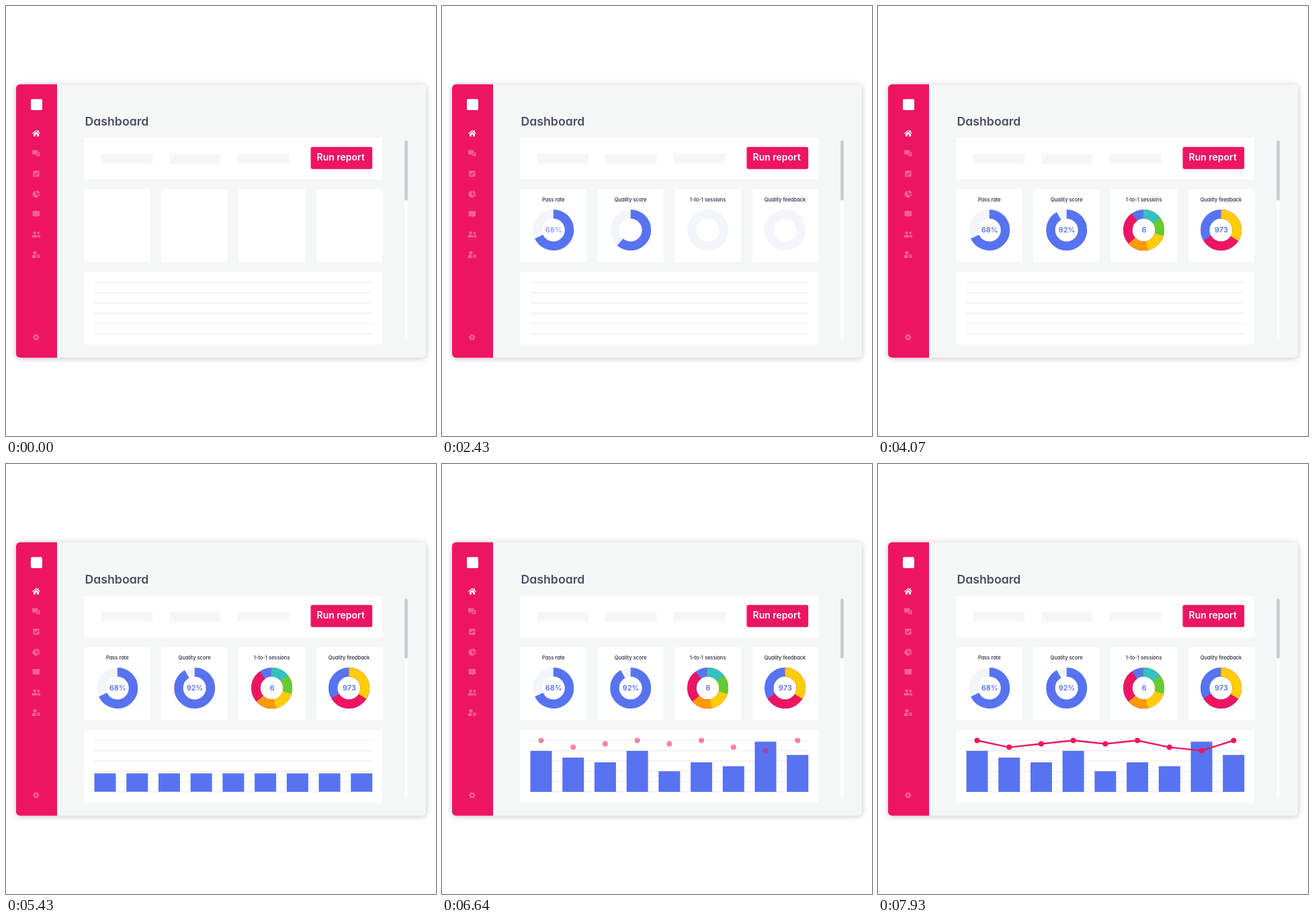
An HTML page for the animation above (8000 ms loop, 640x640 px).

```html
<!DOCTYPE html>
<html lang="en">
<head>
<meta charset="utf-8">
<title>Dashboard</title>
<style>
  html, body { margin: 0; width: 100%; height: 100%; overflow: hidden; background: #fff; }
  svg { display: block; width: 100vw; height: 100vh; }
  text { font-family: Inter, "Open Sans", sans-serif; font-feature-settings: "cv11"; }
  .window { fill: #f5f7f7; filter: drop-shadow(0 1px 4px rgba(0, 0, 0, .24)); }
  .pink { fill: #ed1561; }
  .white { fill: #fff; }
  .field { fill: #f5f7f7; }
  .icons { fill: #fff; opacity: .32; }
  .cut { fill: none; stroke: #ed1561; stroke-width: 1.4; }
  .heading { font-size: 17.7px; font-weight: 600; fill: #4c4c66; }
  .button { font-size: 14px; font-weight: 600; fill: #fff; }
  .title { font-size: 7.5px; font-weight: 500; fill: #25253f; text-anchor: middle; }
  .value { font-size: 11px; font-weight: 600; fill: #5672ee; text-anchor: middle; }
  .grid { stroke: #e5e6e8; stroke-width: 1; }
  .bar { fill: #5873f0; transform-box: fill-box; transform-origin: bottom; }
  .sector { fill: none; stroke-width: 13.5; }
  .trend { stroke: #ed1561; stroke-width: 2.4; stroke-linecap: round; }
</style>
</head>
<body>
<svg viewBox="0 0 640 640">
  <rect class="window" x="15" y="116.5" width="610" height="407" rx="6"/>
  <path class="pink" d="M76 116.5H21a6 6 0 0 0-6 6V517.5a6 6 0 0 0 6 6H76Z"/>
  <rect class="white" x="37" y="138.5" width="17" height="16.5" rx="2"/>
  <path class="white" d="M39 189.6 45 184.4 47.3 186.4V185H48.8V187.7L51 189.6 50.2 190.5 45 186.1 39.8 190.5ZM41 190.6 45 187.2 49 190.6V194.3H46.2V191.3H43.8V194.3H41Z"/>

  <g class="icons">
    <path d="M40 214.5h6.5a1 1 0 0 1 1 1v4a1 1 0 0 1-1 1H43l-2.3 1.8v-1.8H40a1 1 0 0 1-1-1v-4a1 1 0 0 1 1-1Z"/>
    <path d="M48.4 217.5h1.1a1 1 0 0 1 1 1v3.6a1 1 0 0 1-1 1v1.4l-2-1.4H45a1 1 0 0 1-1-1v-.8h3.4a1 1 0 0 0 1-1Z"/>
    <rect x="40.3" y="245" width="9.2" height="9.2" rx="1.2"/>
    <path d="M44.3 275v5.3l3.8 3.8A5.2 5.2 0 1 1 44.3 275Z"/>
    <path d="M45.5 274.3a5 5 0 0 1 4.8 4.9h-4.8ZM46 280.4h4.6a5 5 0 0 1-1.5 3Z"/>
    <path d="M40.5 305h8.6a1 1 0 0 1 1 1v6a1 1 0 0 1-1 1H47l-2.2 2V313h-4.3a1 1 0 0 1-1-1v-6a1 1 0 0 1 1-1Z"/>
    <circle cx="42.6" cy="337.8" r="2.3"/><circle cx="48.3" cy="338" r="1.9"/>
    <path d="M38.5 344.6v-1a2.8 2.8 0 0 1 2.8-2.8h2.6a2.8 2.8 0 0 1 2.8 2.8v1ZM46.6 340.9h2.2a2.4 2.4 0 0 1 2.4 2.4v1.3h-3.6a4.6 4.6 0 0 0-1-3.7Z"/>
    <circle cx="43" cy="367.3" r="2.6"/>
    <path d="M38.7 375v-1.6a2.8 2.8 0 0 1 2.8-2.8h2.7a3.8 3.8 0 0 0 1.3 4.4Z"/>
    <circle cx="48.3" cy="372.3" r="1.8" fill="none" stroke="#fff" stroke-width="1.7"/>
    <circle cx="44.8" cy="493" r="2.7" fill="none" stroke="#fff" stroke-width="2.2"/>
    <circle cx="44.8" cy="493" r="4.1" fill="none" stroke="#fff" stroke-width="1.5" pathLength="12" stroke-dasharray="1" stroke-dashoffset=".5"/>
  </g>
  <path class="cut" d="m42.3 249.7 1.9 1.9 3.4-3.6"/>

  <text class="heading" x="117.5" y="178.2">Dashboard</text>
  <rect class="white" x="116" y="196" width="444" height="62"/>
  <rect class="field" x="141.5" y="219.5" width="76.5" height="15"/>
  <rect class="field" x="243" y="220.3" width="76.5" height="15"/>
  <rect class="field" x="345" y="219.5" width="76.5" height="15"/>
  <rect class="pink" x="453.5" y="209.7" width="91.7" height="33" rx="3"/>
  <text class="button" x="462.5" y="230.3">Run report</text>
  <rect class="white" x="593.3" y="200" width="4.4" height="296" rx="2.2"/>
  <rect fill="#c6c8cc" x="593.3" y="200" width="4.4" height="89.5" rx="2.2"/>
  <rect class="white" x="116" y="396" width="444" height="107.7"/>
  <g id="cards"></g>
  <g id="chart"></g>
</svg>

<script>
const LOOP = 8000;
const SINE = 'cubic-bezier(.37, 0, .63, 1)';
const SINE_OUT = 'cubic-bezier(.39, .575, .565, 1)';
const cards = document.getElementById('cards');
const chart = document.getElementById('chart');

function add(parent, tag, attrs, text = '') {
  const el = document.createElementNS('http://www.w3.org/2000/svg', tag);
  for (const key in attrs) el.setAttribute(key, attrs[key]);
  el.textContent = text;
  return parent.appendChild(el);
}

// Holds `from`, moves once within the loop, then holds `to`.
function tween(el, prop, from, to, start, duration, easing = 'linear') {
  el.animate([
    { [prop]: from, offset: 0 },
    { [prop]: from, offset: start / LOOP, easing },
    { [prop]: to, offset: (start + duration) / LOOP },
    { [prop]: to, offset: 1 }
  ], { duration: LOOP, iterations: Infinity });
}

const fadeIn = (el, start, duration, easing) => tween(el, 'opacity', 0, 1, start, duration, easing);

const BLUE = '#5873f0', PINK = '#ed1561', YELLOW = '#ffcd05';

// Sectors: end angle, colour, optional lag in ms.
const donuts = [
  { title: 'Pass rate', y: 291.4, value: '68%', sectors: [[245, BLUE]] },
  { title: 'Quality score', y: 291.4, value: '92%', sectors: [[331, BLUE]] },
  { title: '1-to-1 sessions', y: 290.6, value: '6', sectors: [
    [360, BLUE], [324, PINK], [228, '#ff9a00'], [168, YELLOW], [107, '#66c936'], [52, '#33c1c1', 95]] },
  { title: 'Quality feedback', y: 291, value: '973', sectors: [[360, BLUE], [239, PINK], [122, YELLOW]] }
];

donuts.forEach(({ title, y, value, sectors }, i) => {
  const cx = 165.8 + 114.9 * i, cy = 333.4;
  add(cards, 'rect', { class: 'white', x: 116 + 115.3 * i, y: 273, width: 98.5, height: 108 });
  fadeIn(add(cards, 'text', { class: 'title', x: cx, y }, title), 760 + 200 * i, 350);

  add(cards, 'circle', { cx, cy, r: 30.5, fill: '#f2f5f9' });
  const hole = add(cards, 'circle', { class: 'white', cx, cy, r: 17 });
  tween(hole, 'r', '31px', '17px', 925 + 200 * i, 300, SINE);

  for (const [angle, stroke, lag = 0] of sectors) {
    const sector = add(cards, 'circle', {
      class: 'sector', cx, cy, r: 23.75, stroke, pathLength: 360, transform: `rotate(-90 ${cx} ${cy})`
    });
    tween(sector, 'strokeDasharray', '0 400', `${angle} 400`, 1617 + 425 * i + lag, 640, SINE);
  }
  fadeIn(add(cards, 'text', { class: 'value', x: cx + .5, y: 337.3 }, value), 2150 + 425 * i, 625, SINE_OUT);
});

const BASE = 488, STEP = 47.72;
for (let i = 0; i < 6; i++) {
  const y = 411.5 + 15.27 * i;
  add(chart, 'line', { class: 'grid', x1: 131.5, x2: 545.3, y1: y, y2: y });
}

// All bars rise at one speed and stop at their own height.
const heights = [61, 51, 44, 61, 30.7, 44, 38.2, 74.7, 55];
heights.forEach((height, i) => {
  const bar = add(chart, 'rect', { class: 'bar', x: 131.5 + STEP * i, y: BASE - height, width: 32, height });
  tween(bar, 'transform', 'scaleY(0)', 'scaleY(1)', 5190, 654 * height / 74.7);
});

const points = [0, 2, 1, 0, 1, 0, 2, 3, 0].map((drop, i) => [147.5 + STEP * i, 411.5 + 5.05 * drop]);
points.slice(1).forEach(([x2, y2], i) => {
  const [x1, y1] = points[i];
  fadeIn(add(chart, 'line', { class: 'trend', x1, y1, x2, y2 }), 7025 + 100 * i, 200);
});
for (const [cx, cy] of points) {
  fadeIn(add(chart, 'circle', { class: 'pink', cx, cy, r: 4 }), 6320, 610);
}
</script>
</body>
</html>
```
